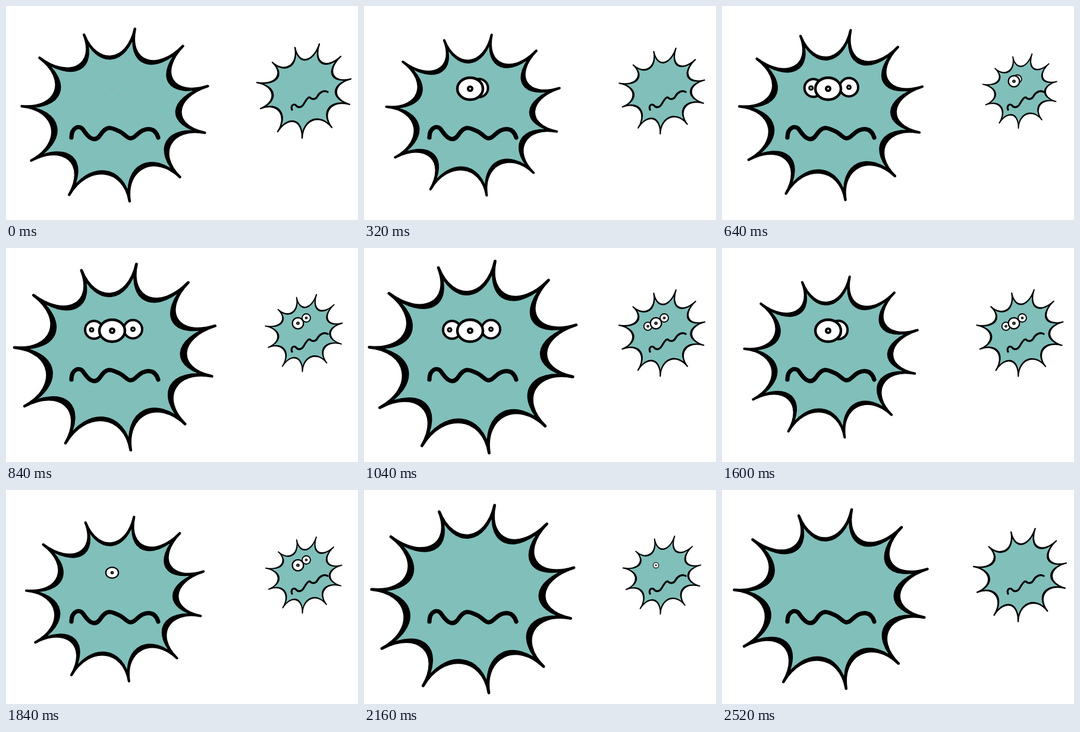
Write an HTML page that moves like this. It is 592 by 361 pixels and loops after 2560 ms.

```html
<!DOCTYPE html>
<html lang="en">
<head>
<meta charset="utf-8">
<style>
  html, body { margin: 0; width: 100%; height: 100%; overflow: hidden; background: #fff; }
  svg { display: block; width: 592px; height: 361px; }
  path { stroke: #000; stroke-linecap: round; stroke-linejoin: round; }
  .skin { fill: #81bfba; stroke: none; }
  .mouth { fill: none; }
</style>
</head>
<body>
<svg id="stage" viewBox="0 0 592 361"></svg>
<script>
const LOOP = 2560, LEAD = 40, PULSE = 1300;
const OPEN = 250, CLOSE = 160, CLOSE_AT = 1400;
const DEPTH = .41;
const stage = document.getElementById('stage');

function el(parent, tag, attrs = {}) {
  const node = document.createElementNS('http://www.w3.org/2000/svg', tag);
  for (const k in attrs) node.setAttribute(k, attrs[k]);
  return parent.appendChild(node);
}

const mix = (a, b, u) => a.map((v, i) => v + (b[i] - v) * u);

// Between two spikes the edge dips towards the centre; its ink is heavier at the sides
function makeBody({ tips, centre, line, ink }) {
  const g = el(stage, 'g');
  let skin = 'M' + tips[0], edge = '';
  tips.forEach((a, i) => {
    const b = tips[(i + 1) % tips.length], m = mix(a, b, .5);
    const dx = m[0] - centre[0], r = Math.hypot(dx, m[1] - centre[1]);
    const d = ink * (.5 + Math.abs(dx) / r) / r / 2;
    const [outA, inA] = [DEPTH - d, DEPTH + d].map(k => mix(a, centre, k));
    const [outB, inB] = [DEPTH - d, DEPTH + d].map(k => mix(b, centre, k));
    skin += `C${mix(a, centre, DEPTH)} ${mix(b, centre, DEPTH)} ${b}`;
    edge += `M${a}C${outA} ${outB} ${b}C${inB} ${inA} ${a}Z`;
  });
  el(g, 'path', { class: 'skin', d: skin + 'Z' });
  el(g, 'path', { d: edge, 'stroke-width': line });
  return g;
}

function makeEye({ x, y, rx, ry = rx, look = 0, pupil, line }) {
  const g = el(stage, 'g');
  el(g, 'ellipse', { cx: x, cy: y, rx, ry, fill: '#fff', stroke: '#000', 'stroke-width': line });
  el(g, 'circle', { cx: x + look, cy: y, r: pupil });
  el(g, 'circle', { cx: x + look, cy: y, r: pupil * .3, fill: '#ddd' });
  return { g, x, y };
}

function makeGerm(o) {
  const body = makeBody(o);
  el(stage, 'path', { class: 'mouth', d: o.mouth, 'stroke-width': o.lip });
  const [left, right, mid] = o.eyes.map(makeEye);
  return { ...o, body, left, right, mid };
}

const germs = [
  makeGerm({
    tips: [[217, 38], [298, 67], [340, 135], [335, 214], [293, 289], [208, 330],
      [106, 319], [42, 261], [26, 169], [56, 87], [131, 48]],
    centre: [185, 184], line: 4.4, ink: 6, lip: 7.2, delay: 0,
    mouth: 'M110 222C110 204 124 200 130 209S148 234 159 217S178 206 190 211' +
      'S206 231 219 218S250 202 256 222',
    eyes: [
      { x: 148, y: 138, rx: 15, look: -4, pupil: 4.5, line: 4 },
      { x: 213.5, y: 137, rx: 15.5, pupil: 4.5, line: 4 },
      { x: 178.5, y: 139.5, rx: 21.5, ry: 18.5, pupil: 5.5, line: 4.4 }],
    pulse: { mean: 1.02, swing: .093, peak: 1030, sharp: .33 }
  }),
  makeGerm({
    tips: [[527, 64], [563, 85], [580, 123], [578, 166], [548, 205], [498, 223],
      [457, 212], [428, 173], [422, 129], [448, 95], [486, 70]],
    centre: [500.5, 143.5], line: 2.3, ink: 1.6, lip: 3.2, delay: 320,
    mouth: 'M481 175C478 167 485 164 488 168S497 172 501 165S509 152 512 155' +
      'S521 158 524 152S535 141 541 145',
    eyes: [
      { x: 477.5, y: 132, rx: 6.8, pupil: 2.3, line: 1.8 },
      { x: 505, y: 118, rx: 7, pupil: 2.3, line: 1.8 },
      { x: 491, y: 127, rx: 9.4, pupil: 2.8, line: 2.3 }],
    pulse: { mean: .893, swing: .107, peak: 65, sharp: 0 }
  })
];

// A sine swell; "sharp" narrows its crest
function swell(t, { mean, swing, peak, sharp }) {
  const p = (t - peak) / PULSE * 2 * Math.PI;
  return mean + swing * Math.cos(p + sharp * Math.sin(p));
}

function ease(t, from, span) {
  const u = Math.min(1, Math.max(0, (t - from) / span));
  return u * u * (3 - 2 * u);
}

const scaleAt = (x, y, s) => `translate(${x} ${y}) scale(${s}) translate(${-x} ${-y})`;

function show(eye, amount, transform) {
  eye.g.setAttribute('visibility', amount > .001 ? 'visible' : 'hidden');
  eye.g.setAttribute('transform', transform);
}

// A side eye comes out from behind the middle one
function slide(eye, mid, amount) {
  const [x, y] = mix([mid.x - eye.x, mid.y - eye.y], [0, 0], amount);
  show(eye, amount, `translate(${x} ${y})`);
}

function draw(now) {
  const t = now % LOOP + LEAD;
  for (const g of germs) {
    g.body.setAttribute('transform', scaleAt(...g.centre, swell(t, g.pulse)));
    // Eyes open middle, right, left and close the other way round
    const e = t - g.delay;
    const [mid, right, left] = [0, 1, 2].map(i =>
      ease(e, OPEN * i, OPEN) - ease(e, CLOSE_AT + CLOSE * (2 - i), i ? CLOSE : CLOSE * 2));
    show(g.mid, mid, scaleAt(g.mid.x, g.mid.y, mid));
    slide(g.right, g.mid, right);
    slide(g.left, g.mid, left);
  }
}

const start = performance.now();
function tick() {
  draw(performance.now() - start);
  requestAnimationFrame(tick);
}
tick();
</script>
</body>
</html>
```
